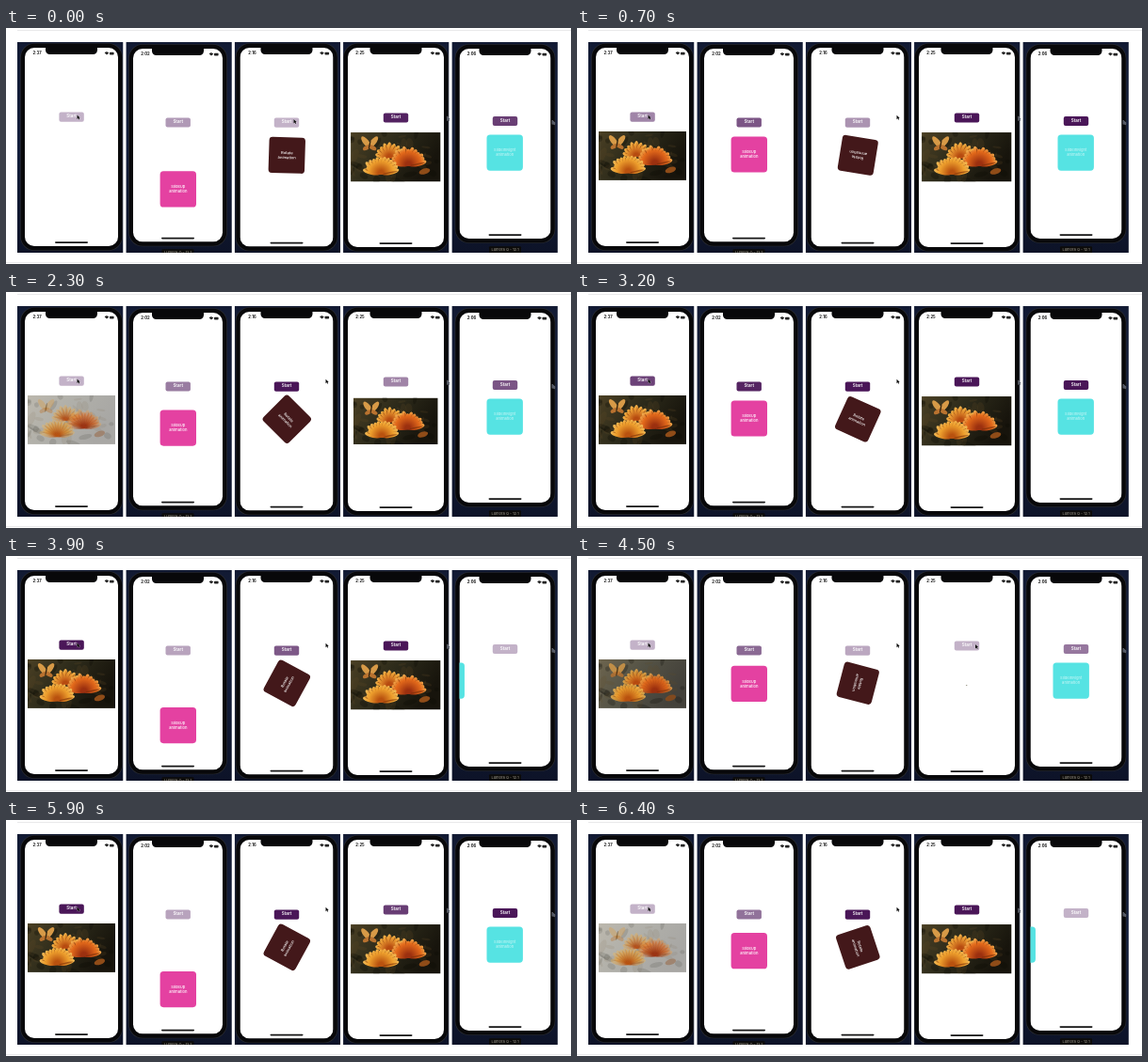
Animation, 600 px wide and 251 px high, one loop 6.5 s. Source, as an HTML page with a canvas:

```html
<!DOCTYPE html>
<html lang="en">
<head>
<meta charset="utf-8">
<title>Five animation demos</title>
<style>
html, body { margin: 0; width: 100%; height: 100%; overflow: hidden; background: #fff; }
canvas { display: block; width: 600px; height: 251px; }
</style>
</head>
<body>
<canvas id="stage"></canvas>
<script>
const W = 600, H = 251, LOOP = 6500;
const PANEL_W = 112.5, PITCH = 115.35;
const FONT = 'Inter, Roboto, sans-serif';
const canvas = document.getElementById('stage');
const g = canvas.getContext('2d');
const ratio = window.devicePixelRatio || 1;
canvas.width = Math.round(W * ratio);
canvas.height = Math.round(H * ratio);

const mod = (a, n) => ((a % n) + n) % n;
const clamp = v => Math.max(0, Math.min(1, v));
const mix = (a, b, u) => a + (b - a) * u;
const ramp = (t, from, length) => clamp((t - from) / length);
const easeInOut = u => u < 0.5 ? 2 * u * u : 1 - 2 * (1 - u) * (1 - u);

function seeded(seed) {
  return () => (seed = (seed * 16807) % 2147483647) / 2147483647;
}

function box(x, y, w, h, r, fill) {
  g.beginPath();
  g.roundRect(x, y, w, h, r);
  g.fillStyle = fill;
  g.fill();
}

function ellipse(x, y, rx, ry, turn, fill) {
  g.beginPath();
  g.ellipse(x, y, rx, ry, turn, 0, Math.PI * 2);
  g.fillStyle = fill;
  g.fill();
}

function label(text, x, y, size, color, weight = 500) {
  g.font = `${weight} ${size}px ${FONT}`;
  g.fillStyle = color;
  g.textAlign = 'center';
  g.textBaseline = 'middle';
  g.fillText(text, x, y);
}

function cursor(x, y, fill = '#111') {
  g.beginPath();
  g.moveTo(x, y);
  g.lineTo(x, y + 4.4);
  g.lineTo(x + 1.2, y + 3.4);
  g.lineTo(x + 2, y + 5);
  g.lineTo(x + 2.7, y + 4.6);
  g.lineTo(x + 2, y + 3.1);
  g.lineTo(x + 3.2, y + 3);
  g.closePath();
  g.strokeStyle = 'rgba(255,255,255,.5)';
  g.lineWidth = 0.6;
  g.stroke();
  g.fillStyle = fill;
  g.fill();
}

// A press dims the button; it then recovers over `rise` ms after `delay`.
function pressAlpha(k, period, delay, rise) {
  const recovered = ramp(k, delay, rise) * (1 - ramp(k, period - 150, 120));
  return mix(0.33, 1, recovered);
}

function button(cx, y, alpha) {
  g.globalAlpha = alpha;
  box(cx - 13.2, y, 26.4, 10.2, 2, '#4a1658');
  g.globalAlpha = 1;
  label('Start', cx, y + 4.4, 4.5, '#fff', 600);
}

function card(cx, cy, fill, title, ink = '#fff') {
  box(cx - 19.2, cy - 19.1, 38.4, 38.2, 3.6, fill);
  label(title, cx, cy - 2.4, 4.1, ink);
  label('animation', cx, cy + 2.6, 4.1, ink);
}

// Fan of overlapping petals opening upward from a base point.
function bloom(x, y, reach, count, core, tip, rand) {
  const glow = g.createRadialGradient(x, y, reach * 0.15, x, y, reach);
  glow.addColorStop(0, core);
  glow.addColorStop(0.6, tip);
  glow.addColorStop(1, '#f2bd5c');
  for (let i = 0; i < count; i++) {
    const a = mix(-2.95, -0.2, i / (count - 1));
    const d = reach * mix(0.42, 0.52, rand());
    ellipse(x + Math.cos(a) * d, y + Math.sin(a) * d * 0.85, d, reach * 0.16, a, glow);
    ellipse(x + Math.cos(a + 0.12) * d, y + Math.sin(a + 0.12) * d * 0.85,
      d * 0.8, reach * 0.04, a, 'rgba(120,45,8,.6)');
  }
}

// Soft stand-in for a photo of orange flowers, on a 95 x 52 area.
function photo(cx, cy, w, h) {
  const rand = seeded(77);
  g.save();
  g.translate(cx - w / 2, cy - h / 2);
  g.scale(w / 95, h / 52);
  g.beginPath();
  g.rect(0, 0, 95, 52);
  g.clip();
  const bg = g.createLinearGradient(0, 0, 70, 52);
  bg.addColorStop(0, '#4b4024');
  bg.addColorStop(0.5, '#2c2a1a');
  bg.addColorStop(1, '#17140c');
  g.fillStyle = bg;
  g.fillRect(0, 0, 95, 52);
  for (let i = 0; i < 40; i++) {
    ellipse(rand() * 95, rand() * 52, 2 + rand() * 7, 1 + rand() * 3, rand() * 3,
      i % 2 ? 'rgba(95,76,38,.22)' : 'rgba(10,10,5,.3)');
  }
  bloom(41, 26, 18, 9, '#b74b10', '#eda035', rand);
  bloom(61, 34, 21, 13, '#9c300f', '#e36a1b', rand);
  bloom(32, 43, 20, 13, '#b9520f', '#eea02e', rand);
  for (const side of [-1, 1]) {
    ellipse(20 + side * 4, 10, 7, 3, side * -0.9, '#d79a47');
    ellipse(20 + side * 3, 16, 4.5, 2.2, side * 0.5, '#b9722f');
  }
  ellipse(20, 13, 0.7, 5, 0.2, '#33230f');
  ellipse(78, 41, 6, 3, -0.3, '#8f4c18');
  g.restore();
}

const phones = [
  { cx: 69.5, w: 99, top: 21, bottom: 232, clock: '2:37', demo: fadeDemo },
  { cx: 182.5, w: 95, top: 22, bottom: 227.5, clock: '2:02', tagY: 239, demo: slideUpDemo },
  { cx: 298, w: 99, top: 21, bottom: 232.5, clock: '2:16', demo: rotateDemo },
  { cx: 414, w: 102, top: 21, bottom: 233, clock: '2:25', demo: zoomDemo },
  { cx: 530, w: 97, top: 22, bottom: 224, clock: '2:06', tagY: 236, demo: slideRightDemo }
];

function body(p, panel) {
  const night = g.createLinearGradient(0, 15, 0, 239);
  night.addColorStop(0, '#121a33');
  night.addColorStop(0.5, '#141f3c');
  night.addColorStop(1, '#0d1328');
  g.fillStyle = night;
  g.fillRect(panel, 15, PANEL_W, 224);
  const x = p.cx - p.w / 2, h = p.bottom - p.top;
  box(x - 4.8, p.top - 4.8, p.w + 9.6, h + 9.6, 15, '#2b2c30');
  box(x - 4.2, p.top - 4.2, p.w + 8.4, h + 8.4, 14.5, '#08080a');
  if (p.tagY) {
    box(p.cx - 17, p.tagY - 3.8, 34, 8, 1, '#0c0b0a');
    label('Lumora Q - 12.1', p.cx, p.tagY, 4, '#8f8b80');
  }
}

function statusIcons(x, y) {
  g.beginPath();
  g.moveTo(x - 3, y + 1.5);
  g.arc(x - 3, y + 1.5, 3, -Math.PI * 0.78, -Math.PI * 0.22);
  g.fillStyle = '#222';
  g.fill();
  box(x, y - 1.2, 4.6, 2.6, 0.7, '#222');
}

function screen(p, t) {
  const x = p.cx - p.w / 2;
  g.save();
  g.beginPath();
  g.roundRect(x, p.top, p.w, p.bottom - p.top, 10);
  g.clip();
  g.fillStyle = '#fff';
  g.fillRect(x, p.top, p.w, p.bottom - p.top);
  box(p.cx - 27.5, p.top - 6, 55, 13, 4.5, '#08080a');
  label(p.clock, x + 13, p.top + 6, 4.2, '#111', 700);
  statusIcons(x + p.w - 9, p.top + 6);
  p.demo(t);
  box(p.cx - 17.5, p.bottom - 4.7, 35, 1.6, 0.8, '#151515');
  g.restore();
}

function fadeDemo(t) {
  const k = mod(t, 2050);
  button(69.6, 89.6, pressAlpha(k, 2050, 400, 1050));
  g.globalAlpha = easeInOut(ramp(k, 0, 580));
  photo(69.5, 135.9, 93, 52);
  g.globalAlpha = 1;
  cursor(75.5, 92.5);
}

function slideUpDemo(t) {
  button(182.7, 95.4, pressAlpha(mod(t + 400, 2000), 2000, 150, 1600));
  const u = ramp(mod(t - 1519, 2000), 0, 1100);
  card(182.8, mix(194.5, 134.5, easeInOut(u)), '#e441a1', 'SlideUp');
}

function rotateDemo(t) {
  button(298, 95.5, pressAlpha(mod(t, 4000), 4000, 400, 1500));
  const u = mod(t, 1000) / 1000;
  const turns = mix(u * u, u, 0.14);
  g.save();
  g.translate(298.3, 135.3);
  g.rotate(turns * Math.PI * 2 + 0.03);
  card(0, 0, '#43181a', 'Rotate');
  g.restore();
  const away = easeInOut(ramp(t, 200, 500));
  cursor(mix(305.5, 339.5, away), mix(97, 92.8, away));
}

function zoomDemo(t) {
  const k = mod(t - 1350, 3050);
  button(414, 90.4, pressAlpha(k, 3050, 600, 1200));
  const s = easeInOut(ramp(k, 0, 1150));
  if (s > 0.006) photo(413.8, 137.3, 95.5 * s, 52.5 * s);
}

function zoomCursor(t) {
  const k = mod(t - 1350, 3050);
  const away = ramp(k, 150, 350) - ramp(k, 2600, 250);
  cursor(mix(423, 468.5, away), 94, away === 1 ? '#555b68' : '#111');
}

function slideRightDemo(t) {
  button(530, 93.9, pressAlpha(mod(t - 1400, 2500), 2500, 100, 1350));
  const u = ramp(mod(t - 1016, 2500), 0, 1200);
  card(mix(451.7, 529.7, easeInOut(u)), 132.6, '#56e3e3', 'SlideInRight', 'rgba(255,255,255,.6)');
}

function draw(t) {
  g.setTransform(ratio, 0, 0, ratio, 0, 0);
  g.fillStyle = '#fff';
  g.fillRect(0, 0, W, H);
  g.fillStyle = '#e9e9ea';
  g.fillRect(12, 2, 588, 1);
  g.fillRect(0, 249, 600, 1);
  phones.forEach((p, i) => {
    const panel = 12 + PITCH * i;
    g.save();
    g.beginPath();
    g.rect(panel, 15, PANEL_W, 224);
    g.clip();
    body(p, panel);
    screen(p, t);
    g.restore();
  });
  zoomCursor(t);
  cursor(580, 98, '#555b68');
}

const start = performance.now();
function tick() {
  draw((performance.now() - start) % LOOP);
  requestAnimationFrame(tick);
}
tick();
</script>
</body>
</html>
```
